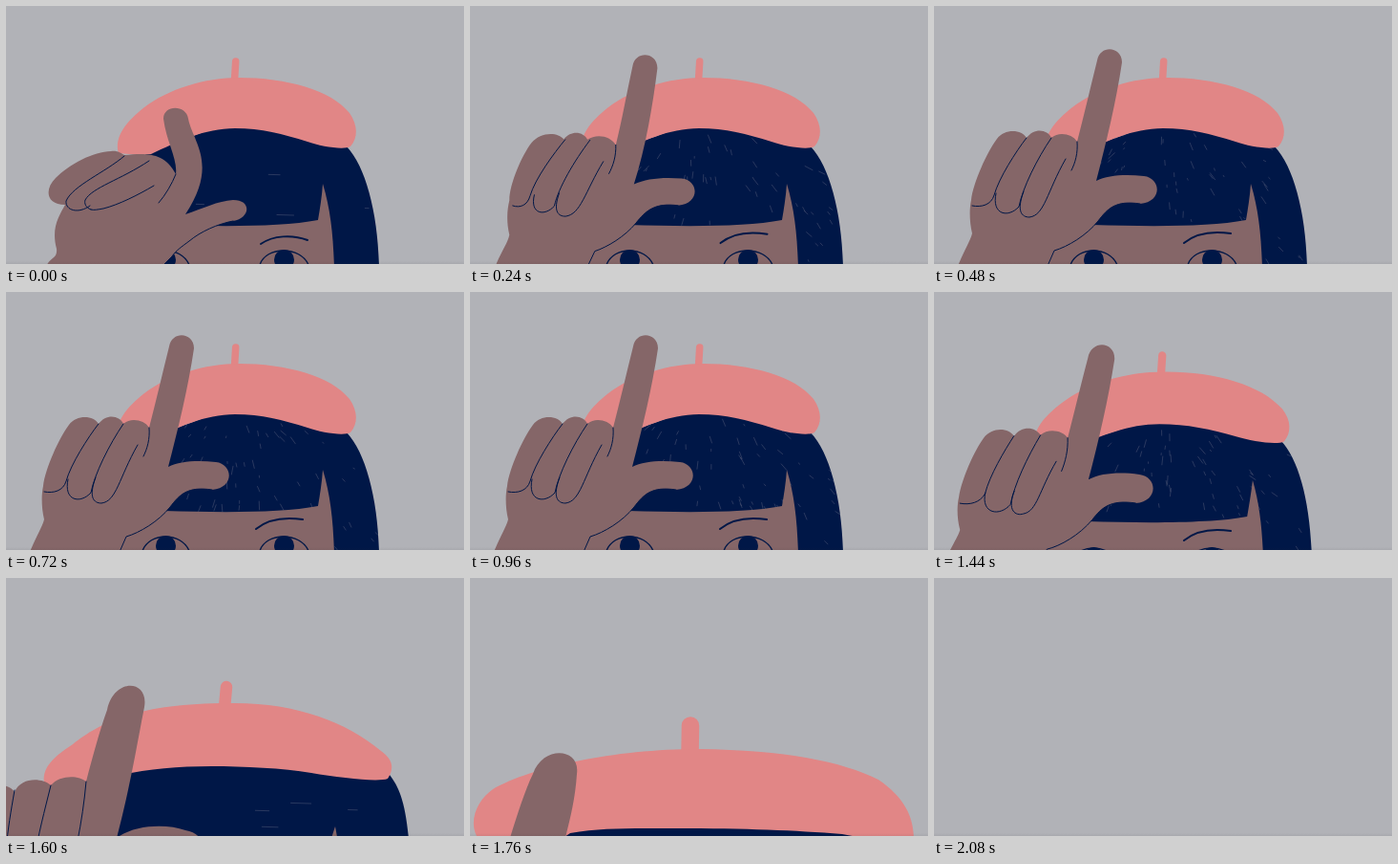
Write an HTML page with a canvas that moves like this. It is 480 px wide and 270 px high and loops after 2.48 s.

```html
<!DOCTYPE html>
<html lang="en">
<head>
<meta charset="utf-8">
<title>Beret and hand</title>
<style>
  html, body { margin: 0; width: 100%; height: 100%; overflow: hidden; background: #b1b2b7; }
  canvas { display: block; width: 480px; height: 270px; }
</style>
</head>
<body>
<canvas id="stage" width="480" height="270"></canvas>
<script>
const ctx = document.getElementById('stage').getContext('2d');
const GREY = '#b1b2b7', PINK = '#e18686', SKIN = '#856668', NAVY = '#001747';
const STEP = 80, LOOP = 2480, LAST = 26;

// [step, pose]: 0 opening hand, 1 rest, 2 sinking, 3 low, beyond 3 leaving the stage
const KEYS = [[0, 0], [1, .3], [2, .65], [3, .9], [4, 1], [17, 1], [18, 1.15],
  [19, 1.55], [20, 2], [21, 2.5], [22, 3], [23, 3.3], [24, 3.65], [25, 4], [26, 5]];

const nums = path => path.match(/-?[\d.]+/g).map(Number);
const lerp = (a, b, t) => a + (b - a) * t;
const shift = (path, dx, dy) => {
  let i = 0;
  return path.replace(/-?[\d.]+/g, n => +n + (i++ % 2 ? dy : dx));
};

// A shape is a path per pose; all paths of one shape share their commands.
function shape(...paths) {
  const sets = paths.map(nums);
  return pose => {
    const i = Math.min(Math.floor(pose), sets.length - 2);
    const t = Math.min(pose - i, 1);
    let k = 0;
    return new Path2D(paths[0].replace(/-?[\d.]+/g, () => {
      const v = lerp(sets[i][k], sets[i + 1][k], t);
      k++;
      return v.toFixed(2);
    }));
  };
}
const headShape = (rest, sink, low) => shape(rest, rest, sink, low);

const beret = headShape(
  'M118 154 C113 137 126 121 145 106 C170 87 208 75 244 75 C294 75 341 88 360 112 C369 125 369 138 361 147 C354 151 330 147 316 142 C290 134 268 128 240 128 C208 128 180 142 152 155 C140 156 128 155 118 154Z',
  'M42 220 C34 202 48 188 70 174 C100 150 142 130 240 131 C305 131 357 151 393 181 C406 190 407 200 400 210 C390 214 350 209 320 204 C290 199 250 197 215 197 C180 197 150 200 120 206 C90 214 60 220 42 220Z',
  'M10 275 C-4 256 8 232 24 221 C64 198 150 179 240 179 C330 180 390 192 428 211 C456 230 464 250 465 270 C455 285 420 273 390 268 C340 264 290 262 215 262 C170 262 140 261 105 267 C80 285 40 290 10 275Z');

const stem = headShape('M239.5 78 L240.7 58', 'M229 136 L231 114', 'M230.5 185 L231 154.5');

const hair = headShape(
  'M146 154 L240 120 L357 147 C377 168 390 217 391 274 L344 274 C343 240 340 212 332 186 C331 200 329 212 327 224 C290 231 230 231 165 229 C155 215 150 180 146 154Z',
  'M100 207 L215 190 L402 206 C416 224 424 248 425 344 L352 344 C352 310 350 285 345 260 C340 275 337 285 335 298 C300 305 200 305 130 303 C115 280 105 240 100 207Z',
  'M80 268 L215 245 L420 270 C443 285 450 330 455 420 L372 420 C372 390 368 360 362 330 C358 345 355 355 350 370 C300 375 180 375 100 375 C90 350 84 310 80 268Z');

const face = headShape(
  'M140 180 L338 180 L350 274 L112 274Z',
  'M140 254 L352 254 L366 350 L112 350Z',
  'M150 324 L368 324 L380 420 L120 420Z');

const hand = shape(
  'M42 272 C48 262 54 264 53 254 C47 232 56 219 62 208 C42 208 40 192 52 180 C66 166 92 152 110 152 C117 151 120 154 124 156 C145 154 166 152 178 176 C180 160 168 142 165 118 C165 103 189 103 191 118 C196 143 223 165 188 218 C206 212 222 204 238 203 C258 203 256 222 238 225 C222 228 204 236 192 246 C184 252 178 256 174 262 L164 272Z',
  'M25 272 C32 255 38 246 40 238 C37 225 37 212 39 203 C41 185 56 152 66 139 C74 128 92 129 97 138 C105 127 119 129 123 138 C131 131 145 134 150 142 C157 115 164 85 171 57 C174 40 197 42 197 59 C191 100 180 145 170 183 C182 177 200 176 220 178 C238 180 240 205 216 207 C190 203 182 212 172 225 C160 240 140 252 126 256 L119 272Z',
  'M-70 344 C-60 330 -50 320 -45 312 C-50 300 -50 290 -47 280 C-42 265 -36 245 -28 232 C-16 214 2 214 9 224 C16 208 38 209 47 217 C56 206 76 206 84 213 C90 190 98 160 106 138 C113 104 150 106 145 135 C138 170 130 220 116 272 C135 258 168 257 188 264 C215 268 210 300 185 300 C150 296 140 305 130 315 C110 335 90 344 75 344 L66 350Z',
  'M-100 430 C-90 410 -80 400 -75 390 C-80 380 -80 370 -75 360 C-70 345 -60 320 -55 315 C-45 300 -20 300 -12 306 C0 292 20 292 25 300 C30 290 36 288 38 284 C46 260 56 225 66 205 C76 175 116 177 112 205 C110 235 104 255 98 280 C120 340 160 340 175 345 C205 350 200 380 175 382 C150 378 140 385 130 395 C110 415 90 420 75 425 L60 440Z');

const crease = (open, rest, sink) => shape(open, rest, sink, shift(sink, -45, 85));
const creases = [
  crease('M88 209 C76 218 62 214 63 204 C70 188 104 174 124 157',
    'M40 209 C50 211 60 208 63 198 C68 180 86 152 97 138',
    'M-45 290 C-30 292 -18 290 0 285 C2 262 5 245 9 222'),
  crease('M89 213 C83 211 82 206 83 203 C90 190 120 182 150 162',
    'M65 196 C60 219 78 222 89 210 C93 190 108 160 123 138',
    'M-10 290 C-15 310 20 310 30 292 C34 268 40 245 47 217'),
  crease('M89 213 C92 214 96 213 102 212 C118 208 138 198 155 188',
    'M94 194 C86 215 92 221 100 221 C116 219 118 195 138 160',
    'M28 290 C20 310 50 312 58 295 C62 290 66 280 72 275'),
  crease('M178 176 C174 186 167 198 160 206',
    'M150 142 C151 154 148 164 144 172',
    'M84 213 C82 235 79 255 75 275'),
  crease('M238 225 C222 228 204 236 192 246 C184 252 178 256 174 262 L164 272',
    'M216 207 C190 203 182 212 172 225 C160 240 140 252 126 256 L119 272',
    'M185 300 C150 296 140 305 130 315 C110 335 90 344 75 344 L66 350')
];

const browRest = 'M262 248 C274 238 290 235 311 238';
const brow = shape('M267 249 C280 240 300 239 316 245', browRest,
  shift(browRest, 0, 80), shift(browRest, 0, 150));
const lids = ['M143 271 C150 251 184 251 192 271', 'M266 271 C272 251 309 251 317 271']
  .map(d => headShape(d, shift(d, 0, 80), shift(d, 0, 150)));

function random(seed) {
  let s = seed * 7919 + 17;
  return () => (s = (s * 16807 + 11) % 2147483647) / 2147483647;
}

function fill(path, color) {
  ctx.fillStyle = color;
  ctx.fill(path);
}

function line(path, color, width) {
  ctx.strokeStyle = color;
  ctx.lineWidth = width;
  ctx.stroke(path);
}

// Dry-brush marks in the hair, redrawn on every step.
function scratches(step, clip, drop) {
  const rnd = random(step + 3);
  const sparse = step < 2 || step > 18;
  for (let i = 0; i < 6; i++) rnd();
  ctx.save();
  ctx.clip(clip);
  ctx.globalAlpha = .42;
  const marks = new Path2D();
  for (let i = 0; i < (sparse ? 5 : 62); i++) {
    const x = lerp(175, 388, rnd());
    const y = lerp(132, x > 335 ? 268 : 226, rnd());
    const angle = sparse ? .03 : Math.atan2(y - 80, x - 240) + (rnd() - .5) * .5;
    const len = sparse ? lerp(2, 26, rnd()) : lerp(1.5, 9, rnd());
    marks.moveTo(x, y + drop);
    marks.lineTo(x + Math.cos(angle) * len, y + drop + Math.sin(angle) * len);
  }
  line(marks, '#9b95a4', .65);
  ctx.restore();
}

function poseAt(step) {
  const i = Math.max(1, KEYS.findIndex(k => k[0] >= step));
  const [a, p] = KEYS[i - 1], [b, q] = KEYS[i];
  return lerp(p, q, (step - a) / (b - a));
}

function draw(step) {
  const pose = poseAt(step);
  const exit = Math.max(0, pose - 3);
  const sink = Math.min(Math.max(pose - 1, 0), 2);
  const drop = sink < 1 ? sink * 80 : lerp(80, 150, sink - 1);

  ctx.fillStyle = GREY;
  ctx.fillRect(0, 0, 480, 270);
  ctx.save();
  ctx.lineCap = ctx.lineJoin = 'round';
  ctx.translate(240, 95 * exit);
  ctx.scale(1 + .12 * exit, 1);
  ctx.translate(-240, 0);

  fill(face(pose), SKIN);
  lids.forEach((lid, i) => {
    const iris = new Path2D();
    iris.arc(i ? 291.5 : 167.5, 265.5 + drop, 10.5, 0, Math.PI * 2);
    fill(iris, NAVY);
    line(lid(pose), NAVY, 1.4);
  });
  line(brow(pose), NAVY, 2);

  const locks = hair(pose);
  fill(locks, NAVY);
  scratches(step, locks, drop);

  const width = sink < 1 ? lerp(7.5, 12.5, sink) : lerp(12.5, 18.5, sink - 1);
  line(stem(pose), PINK, width);
  fill(beret(pose), PINK);

  fill(hand(pose), SKIN);
  creases.forEach(c => line(c(pose), NAVY, 1));
  ctx.restore();

  const edge = ctx.createLinearGradient(0, 267, 0, 270);
  edge.addColorStop(0, 'rgba(40,40,45,0)');
  edge.addColorStop(1, 'rgba(40,40,45,.07)');
  ctx.fillStyle = edge;
  ctx.fillRect(0, 267, 480, 3);
}

const start = performance.now();
let shown = -1;
function tick() {
  const time = Math.max(0, performance.now() - start) % LOOP;
  const step = Math.min(LAST, Math.floor(time / STEP));
  if (step !== shown) draw(shown = step);
  requestAnimationFrame(tick);
}
tick();
</script>
</body>
</html>
```
